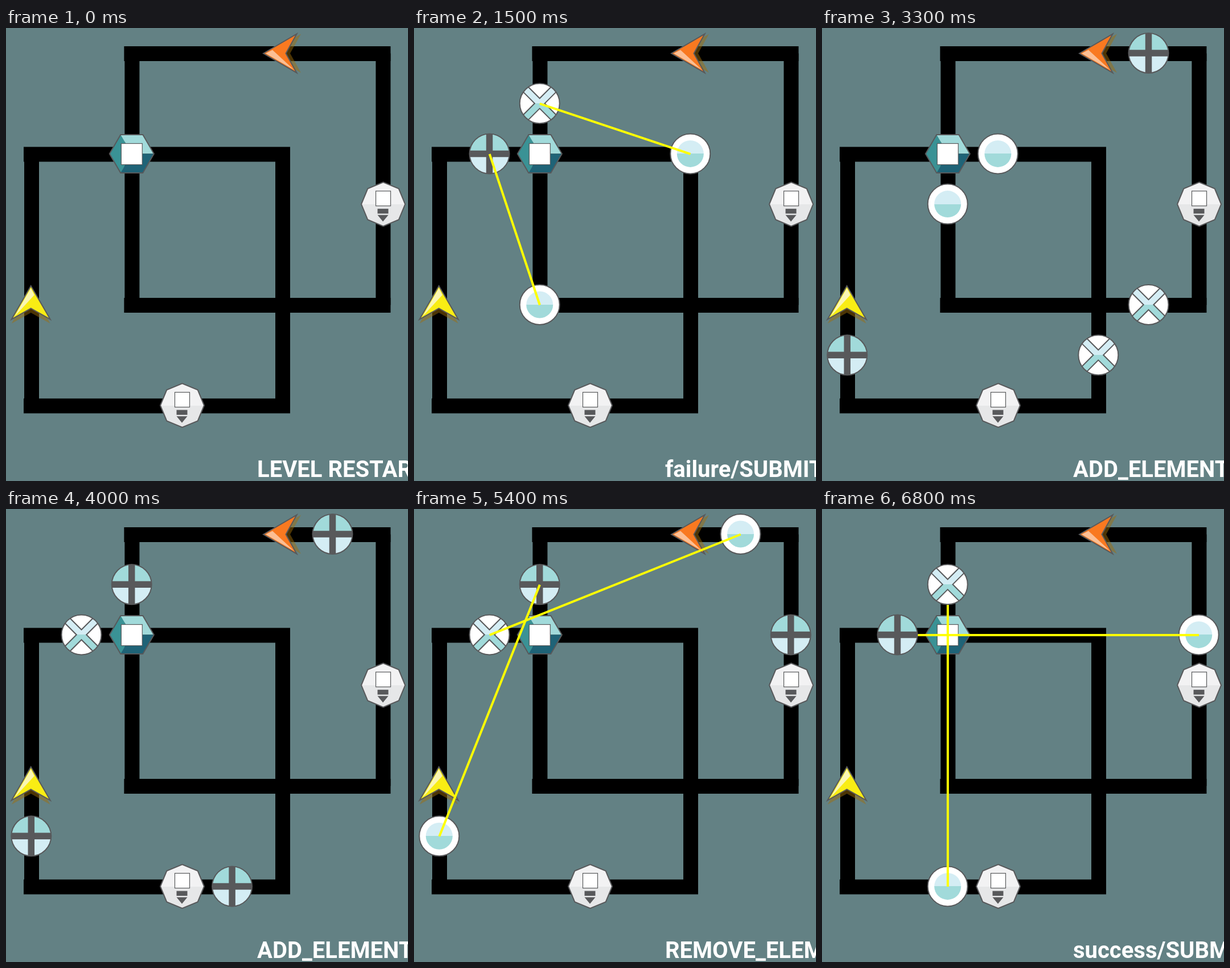
Animation, 706 px wide and 794 px high, one loop 6900 ms. Source, as an HTML page with a canvas:

```html
<!DOCTYPE html>
<html lang="en">
<head>
<meta charset="utf-8">
<title>Level editor replay</title>
<style>
html, body { margin: 0; width: 100%; height: 100%; overflow: hidden; background: #638184; }
canvas { display: block; }
</style>
</head>
<body>
<canvas id="stage" width="706" height="794"></canvas>
<script>
const c = document.getElementById('stage').getContext('2d');
const STEP = 100, DARK = '#58595b', PALE = '#d4edf4', AQUA = '#a1dada';
const at = i => 44.5 + 88.2 * i;

// One action per step. z: restart, a: add kind at cell, m: move, r: remove,
// l: link two cells, f / s: submit with failure / success.
const actions = `
  z a+12 ax21 ao23 ao32 l1223 l2132 f
  z a+12 ax21 ao25 ao52 l1225 l2152 f
  z a+12 ax21 ao35 ao53 l1235 f
  z ax06 m0656 a+06 ax65 a+60 ao24 ao42 m2423 r42 ao32
  f r23 r32 r65 m5612 a+21 a+47 f m4717 r06 m1747 m4717 m1727
  r60 ao60 ao06 a+72 l1260 l2106 f r27 r72 f
  z ao27 ao72 a+52 ax25 l5272 l2527 m5232 m2523 m3212 m2321 s
`.trim().split(/\s+/);

const labels = {
  z: 'LEVEL RESTARTED', a: 'ADD_ELEMENT', l: 'ADD_ELEMENT', m: 'MOVE_ELEMENT',
  r: 'REMOVE_ELEMENT', f: 'failure/SUBMIT', s: 'success/SUBMIT'
};

function replay(last) {
  let items = [];
  const find = (x, y) => items.find(e => e.kind && e.x === +x && e.y === +y);
  for (const [op, p, q, r, s] of actions.slice(0, last + 1)) {
    if (op === 'z') items = [];
    if (op === 'a') items.push({ kind: p, x: +q, y: +r });
    if (op === 'l') items.push({ from: find(p, q), to: find(r, s) });
    if (op === 'r' || op === 'm') {
      const e = find(p, q);
      items = items.filter(i => i !== e);
      if (op === 'm') items.push(Object.assign(e, { x: +r, y: +s }));
    }
  }
  return items;
}

function shape(points, fill, stroke, width = 2) {
  c.beginPath();
  points.forEach(([x, y]) => c.lineTo(x, y));
  c.closePath();
  if (fill) { c.fillStyle = fill; c.fill(); }
  if (stroke) { c.strokeStyle = stroke; c.lineWidth = width; c.stroke(); }
}

function line(x1, y1, x2, y2, color, width) {
  c.beginPath();
  c.moveTo(x1, y1);
  c.lineTo(x2, y2);
  c.strokeStyle = color;
  c.lineWidth = width;
  c.stroke();
}

function disc(r, fill, stroke) {
  c.beginPath();
  c.arc(0, 0, r, 0, 2 * Math.PI);
  if (fill) { c.fillStyle = fill; c.fill(); }
  if (stroke) { c.strokeStyle = stroke; c.lineWidth = 2; c.stroke(); }
}

// Two flat colours meeting at y = 0.
function split(top, bottom) {
  const g = c.createLinearGradient(0, -40, 0, 40);
  g.addColorStop(0.5, top);
  g.addColorStop(0.5, bottom);
  return g;
}

function box(x, y, size, width) {
  c.fillStyle = '#fff';
  c.fillRect(x, y, size, size);
  c.strokeStyle = DARK;
  c.lineWidth = width;
  c.strokeRect(x, y, size, size);
}

function place(x, y, draw, angle = 0) {
  c.save();
  c.translate(x, y);
  c.rotate(angle);
  draw();
  c.restore();
}

function track(i, j) {
  const x = at(i), y = at(j), far = 441;
  c.fillStyle = '#000';
  for (const d of [0, far]) {
    c.fillRect(x - 13.5, y - 12.5 + d, far + 27, 26);
    c.fillRect(x - 12.5 + d, y, 26, far);
  }
}

function hexagon() {
  const v = [[-39, 0], [-19.5, -33.5], [19.5, -33.5], [39, 0], [19.5, 33.5], [-19.5, 33.5]];
  const mid = [0, 0];
  shape([v[0], v[1], mid, v[5]], '#3a9295');
  shape([v[1], v[2], v[3], mid], '#a1dada');
  shape([v[3], v[4], v[5], mid], '#1f6377');
  shape(v, null, DARK);
  box(-18.5, -18, 37, 1.2);
}

function octagon() {
  const v = [...Array(8).keys()].map(k => [38.5 * Math.cos(k * Math.PI / 4), 38.5 * Math.sin(k * Math.PI / 4)]);
  shape(v, split('#f2f2f3', '#e6e7e8'), DARK);
  box(-13, -23, 26, 1.2);
  c.fillStyle = DARK;
  c.fillRect(-10, 8, 19, 8.5);
  shape([[-10, 19], [9, 19], [-0.5, 30.5]], DARK);
}

function arrow(color, light) {
  const v = [[0, -32], [34, 26.5], [0, 7.5], [-34, 26.5]];
  shape(v.map(([x, y]) => [x, y + 7.5]), 'rgba(160,110,10,.48)');
  shape(v, color);
  shape([[0, -28], [6, -16], [-29, 22]], light);
  shape(v, null, DARK);
}

const kinds = {
  '+'() {
    disc(35, split(AQUA, PALE));
    line(-35, 0, 35, 0, DARK, 11.5);
    line(0, -35, 0, 35, DARK, 11.5);
    disc(35, null, DARK);
  },
  x() {
    disc(35, '#fff');
    c.save();
    c.clip();
    for (const [color, width] of [[DARK, 14.5], [split(PALE, AQUA), 10.5]]) {
      line(-30, -30, 30, 30, color, width);
      line(-30, 30, 30, -30, color, width);
    }
    c.restore();
    disc(35, null, DARK);
  },
  o() {
    disc(35, '#fff', DARK);
    disc(23.5, split(PALE, AQUA));
  }
};

function draw(now) {
  const step = Math.floor(now / STEP) % actions.length;
  c.fillStyle = '#638184';
  c.fillRect(0, 0, 706, 794);
  track(2, 0);
  track(0, 2);
  place(43.7, 484, () => arrow('#f9ed14', '#faf6b4'));
  place(484, 44.5, () => arrow('#f97920', '#fcbf94'), -Math.PI / 2);
  place(220.8, 220.5, hexagon);
  place(662.5, 308.8, octagon);
  place(309.5, 661.5, octagon);
  for (const { kind, x, y, from, to } of replay(step)) {
    if (kind) place(at(x) - 0.2, at(y) - 0.5, kinds[kind]);
    else line(at(from.x), at(from.y), at(to.x), at(to.y), '#ff0', 4);
  }
  c.fillStyle = '#fff';
  c.font = 'bold 40px Roboto, sans-serif';
  c.fillText(labels[actions[step][0]], 441, 787);
  requestAnimationFrame(draw);
}
requestAnimationFrame(draw);
</script>
</body>
</html>
```
